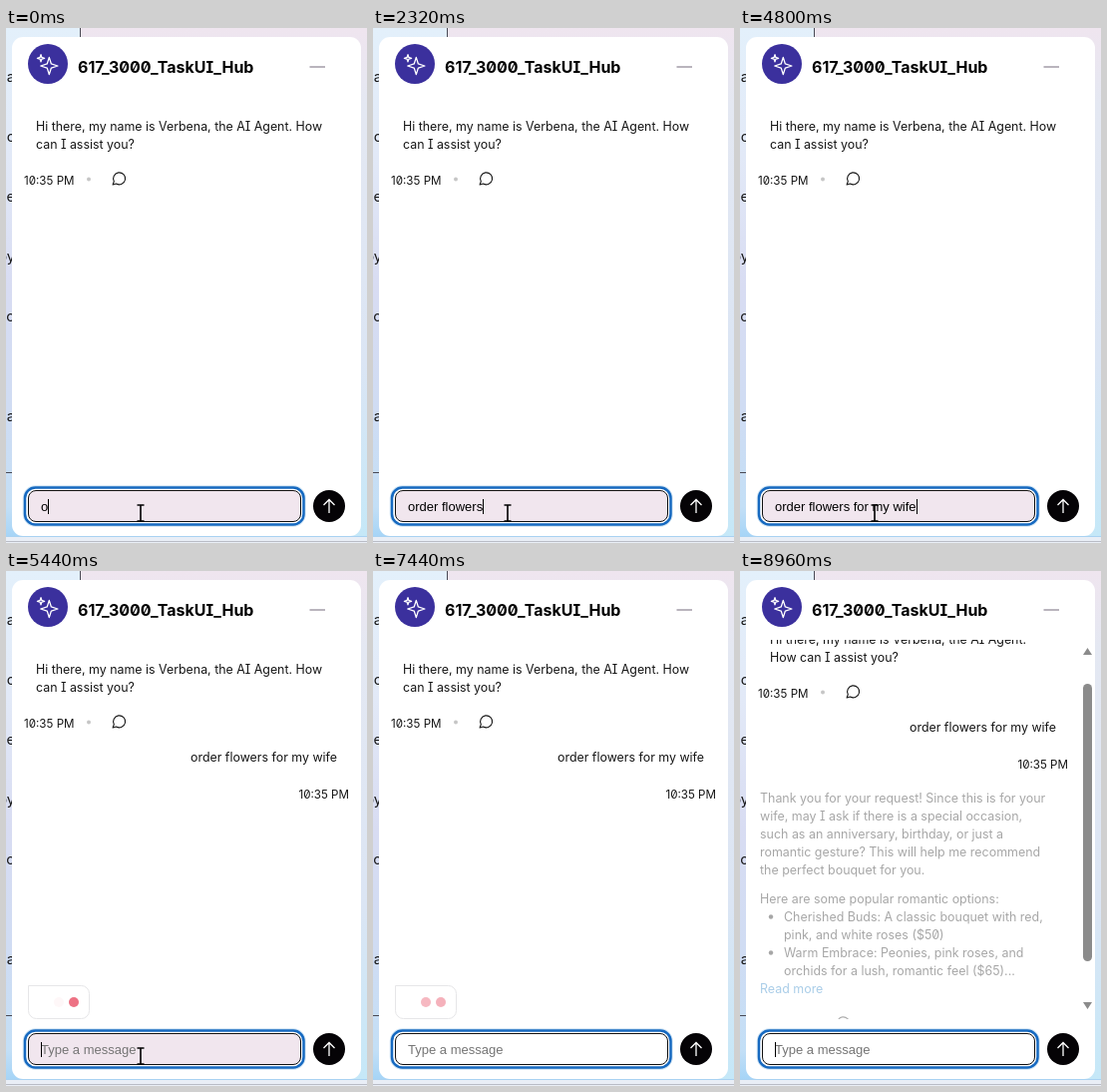
An HTML page for the animation above (9040 ms loop, 362x516 px).

```html
<!DOCTYPE html>
<html lang="en">
<head>
<meta charset="utf-8">
<title>Chat</title>
<style>
  html, body { margin: 0; width: 100%; height: 100%; overflow: hidden; background: #fff; }
  svg { display: block; width: 362px; height: 516px; }
  text { font: 12.4px Inter, "Noto Sans", sans-serif; font-feature-settings: "zero", "cv08"; white-space: pre; fill: #161616; }
  .title { font-size: 16px; font-weight: 700; fill: #000; }
  .time { font-size: 11.6px; }
  .reply text { font-size: 12.45px; fill: #000; }
  .reply .link { fill: #0970bd; }
  .field { font: 13px "Liberation Sans", Arial, sans-serif; fill: #000; }
  .hint { fill: #757575; }
  .page { font-size: 14.5px; text-anchor: end; }
  .end { text-anchor: end; }
</style>
</head>
<body>
<svg viewBox="0 0 362 516">
  <defs>
    <linearGradient id="left" x2="0" y2="1">
      <stop stop-color="#e3f0fb"/><stop offset=".25" stop-color="#e2e9f7"/>
      <stop offset=".5" stop-color="#d8dcf2"/><stop offset=".75" stop-color="#cfdcf3"/>
      <stop offset=".93" stop-color="#c3dff6"/><stop offset="1" stop-color="#9fd2f7"/>
    </linearGradient>
    <linearGradient id="right" x2="0" y2="1">
      <stop stop-color="#efe5ef"/><stop offset=".15" stop-color="#e4e8f2"/>
      <stop offset=".65" stop-color="#dbe5f4"/><stop offset="1" stop-color="#c4e8f8"/>
    </linearGradient>
    <clipPath id="viewport"><path d="M6 69H356V449H6Z"/></clipPath>
    <path id="bubbleIcon" d="M-5.9 6 L-4.7 2.7 A6 6 0 1 1 -2.5 5 Z" fill="none" stroke="#161616" stroke-width="1.1" stroke-linejoin="round"/>
  </defs>

  <rect width="75" height="516" fill="url(#left)"/>
  <rect x="75" width="287" height="516" fill="url(#right)"/>
  <path d="M74.5 0V10M0 445.5H8" stroke="#4a4a55"/>
  <g id="pageText"></g>
  <rect y="510" width="362" height="6" fill="#e9eef6"/>
  <path d="M0 509.5H362" stroke="#a9d2f2"/>
  <path d="M0 514.5H362" stroke="#b9bcc6"/>
  <rect x="6" y="9" width="350" height="500" rx="11" fill="#fff"/>

  <circle cx="42" cy="36" r="20" fill="#3b309d"/>
  <g id="stars" fill="none" stroke="#fff" stroke-width="1.3" stroke-linejoin="round"></g>
  <text class="title" x="72" y="45">617_3000_TaskUI_Hub</text>
  <path d="M304.5 39H320" stroke="#b9b4bd" stroke-width="2"/>

  <g clip-path="url(#viewport)">
    <g id="history">
      <text x="30" y="103" id="hello1"></text>
      <text x="30" y="121" id="hello2"></text>
      <text class="time" x="18" y="157">10:35 PM</text>
      <circle cx="83" cy="151.5" r="2" fill="#c6c6c6"/>
      <use href="#bubbleIcon" x="113" y="151"/>
      <g id="sent">
        <text class="end" x="332" y="191">order flowers for my wife</text>
        <text class="time end" x="344" y="228">10:35 PM</text>
      </g>
    </g>
    <g id="reply" class="reply"></g>
  </g>

  <g id="scrollbar" fill="#8b8b8b">
    <rect x="344" y="113" width="9" height="278" rx="4.5"/>
    <path d="M344 84L348.5 77L353 84ZM344 432L348.5 439L353 432Z"/>
  </g>

  <g id="typing">
    <path d="M22.5 415.5H75.5a8 8 0 0 1 8 8V440.5a8 8 0 0 1 -8 8H30.5a8 8 0 0 1 -8 -8Z" fill="#fff" stroke="#e6e6e8"/>
    <g id="dots" fill="#ec6a7d"></g>
  </g>

  <rect x="19" y="460.5" width="279.5" height="37" rx="10.5" fill="none" stroke="#cfe4f4" stroke-width="4.5"/>
  <rect x="19" y="460.5" width="279.5" height="37" rx="10.5" fill="#fff" stroke="#1669c0" stroke-width="2.5"/>
  <rect id="box" x="22.5" y="463.5" width="273" height="31" rx="7.5" stroke="#111"/>
  <text class="field hint" id="hint" x="35" y="484">Type a message</text>
  <text class="field" id="typed" x="35" y="484"></text>
  <path id="caret" d="M.5 472V487" stroke="#000"/>
  <path id="pointer" d="M131.5 478H138.5M135 478V494M131.5 494H138.5" fill="none" stroke="#000" stroke-width="1.6"/>

  <circle cx="324" cy="479" r="16" fill="#050306"/>
  <path d="M324 486V472.5M318.5 478L324 472.5L329.5 478" fill="none" stroke="#fff" stroke-width="1.3"/>
</svg>
<script>
const LOOP = 9040, STEP = 80;
const KEY_DELAY = 190, SENT = 5040, TYPING = 5200, POINTER_OUT = 7360, REPLY = 8780;
const CARET_START = 5360, CARET_PERIOD = 1060;
const DOT_CYCLE = 2240, DOT_START = 3788;
const MESSAGE = "order flowers for my wife";

const $ = id => document.getElementById(id);
const show = (id, on) => $(id).setAttribute("visibility", on ? "visible" : "hidden");
const mod = (a, n) => ((a % n) + n) % n;

function add(parent, tag, attrs, content = "") {
  const el = document.createElementNS("http://www.w3.org/2000/svg", tag);
  for (const key in attrs) el.setAttribute(key, attrs[key]);
  el.textContent = content;
  $(parent).appendChild(el);
  return el;
}

function star(x, y, r) {
  const k = r * 0.24;
  add("stars", "path", { d: `M${x} ${y - r}L${x + k} ${y - k}L${x + r} ${y}L${x + k} ${y + k}` +
    `L${x} ${y + r}L${x - k} ${y + k}L${x - r} ${y}L${x - k} ${y - k}Z` });
}
star(43.3, 38, 8.6);
star(35, 30.3, 3.6);

[["a", 54], ["c", 114], ["e", 174], ["by", 234], ["o", 294], ["a", 394]]
  .forEach(([s, y]) => add("pageText", "text", { class: "page", x: 9, y }, s));

const paragraph = (x, y, lines) =>
  lines.forEach((s, i) => add("reply", "text", { x, y: y + i * 18 }, s));
paragraph(20, 231.5, [
  "Thank you for your request! Since this is for your",
  "wife, may I ask if there is a special occasion,",
  "such as an anniversary, birthday, or just a",
  "romantic gesture? This will help me recommend",
  "the perfect bouquet for you."
]);
paragraph(20, 332.5, ["Here are some popular romantic options:"]);
paragraph(44, 350.5, [
  "Cherished Buds: A classic bouquet with red,",
  "pink, and white roses ($50)",
  "Warm Embrace: Peonies, pink roses, and",
  "orchids for a lush, romantic feel ($65)..."
]);
[346.5, 382.5].forEach(cy => add("reply", "circle", { cx: 31, cy, r: 2.2 }));
add("reply", "text", { class: "link", x: 20, y: 422.5 }, "Read more");
add("reply", "use", { href: "#bubbleIcon", x: 103, y: 453 });

const dots = [38, 53, 68].map(cx => add("dots", "circle", { cx, cy: 432, r: 5 }));

function drawDots(t) {
  const wave = mod(t - DOT_START, DOT_CYCLE) / DOT_CYCLE * 4 - 1;
  dots.forEach((dot, i) => dot.setAttribute("opacity", Math.max(0, 1 - Math.abs(wave - i))));
}

function drawField(t) {
  const sent = t >= SENT;
  $("typed").textContent = sent ? "" : MESSAGE.slice(0, 1 + Math.floor(t / KEY_DELAY));
  show("hint", sent);
  const width = sent ? 0 : $("typed").getComputedTextLength();
  $("caret").setAttribute("transform", `translate(${Math.round(35 + width)} 0)`);
  show("caret", !sent || mod(t - CARET_START, CARET_PERIOD) < CARET_PERIOD / 2);
  $("box").setAttribute("fill", t < POINTER_OUT ? "#f1e6ee" : "#fff");
  show("pointer", t < POINTER_OUT);
}

function drawMessages(t) {
  const replied = t >= REPLY;
  $("hello1").textContent = "Hi there, my name is Verbena, the AI Agent." + (replied ? "" : " How");
  $("hello2").textContent = (replied ? "How " : "") + "can I assist you?";
  $("history").setAttribute("transform", `translate(0 ${replied ? -30 : 0})`);
  $("sent").setAttribute("transform", `translate(${replied ? -15 : 0} 0)`);
  show("sent", t >= SENT);
  show("typing", t >= TYPING && !replied);
  show("scrollbar", replied);
  show("reply", replied);
  $("reply").setAttribute("opacity", Math.max(0, (t - REPLY) / 520));
}

function render(time) {
  const t = Math.floor(mod(time, LOOP) / STEP) * STEP;
  drawField(t);
  drawMessages(t);
  drawDots(t);
}

const start = performance.now();
function tick() {
  render(performance.now() - start);
  requestAnimationFrame(tick);
}
tick();
</script>
</body>
</html>
```
